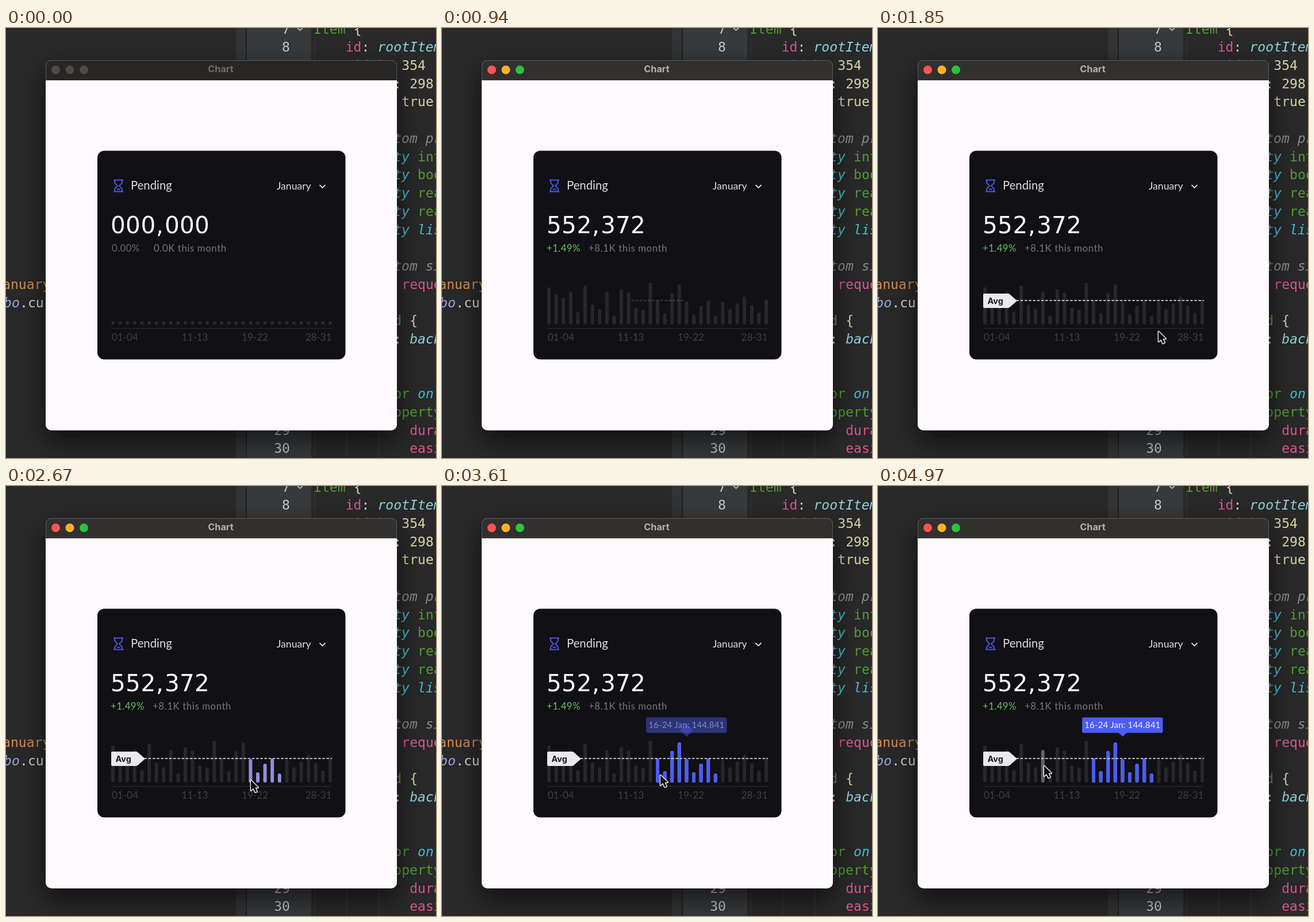
Animation, 748 px wide and 748 px high, one loop 5 s. Source, as an HTML page with a canvas:

```html
<!DOCTYPE html>
<html lang="en">
<head>
<meta charset="utf-8">
<title>Chart</title>
<style>
html, body { margin: 0; width: 100%; height: 100%; overflow: hidden; background: #28292a; }
canvas { display: block; }
</style>
</head>
<body>
<canvas id="stage" width="748" height="748"></canvas>
<script>
const ctx = document.getElementById('stage').getContext('2d');
const LOOP = 5000, CARD = '#111014', BLUE = '#4c5cf5';
const MONO = '"DejaVu Sans Mono", monospace', LATO = 'Lato, sans-serif', INTER = 'Inter, sans-serif';
const GREEN = '#4f9d31', PINK = '#e2528e', CYAN = '#45bccf', PALE = '#8fd2df',
      SAND = '#dad7a4', GREY = '#87888a', PLAIN = '#d4d4d1';

// [line, column, text, colour, italic]
const CODE = [
  [7, 0, 'Item', GREEN], [7, 5, '{', SAND],
  [8, 4, 'id', PINK], [8, 6, ':', PLAIN], [8, 8, 'rootItem', PALE, 1],
  [9, 4, 'width', PINK], [9, 11, '354', SAND],
  [10, 10, ':', PLAIN], [10, 12, '298', SAND],
  [11, 11, 'true', SAND],
  [13, 4, '// Custom properties', GREY, 1],
  ...['int', 'bool', 'real', 'real'].flatMap((type, i) =>
    [[14 + i, 4, 'property', CYAN, 1], [14 + i, 13, type, GREEN]]),
  [18, 4, 'property', CYAN, 1], [18, 13, 'list', CYAN, 1],
  [20, 4, '// Custom signals', GREY, 1],
  [21, 11, 'request', PINK],
  [23, 10, 'd', GREEN], [23, 12, '{', SAND],
  [24, 10, ':', PLAIN], [24, 12, 'back', PALE, 1],
  [27, 4, 'Behavior', GREEN], [27, 13, 'on', CYAN, 1],
  [28, 8, 'PropertyAnimation', GREEN],
  [29, 12, 'duration', PINK], [30, 12, 'easing', PINK]
];

const HEIGHTS = [65, 53, 47, 57, 22, 68, 35, 27, 57, 16, 62, 56, 30, 26, 73, 42,
                 20, 55, 70, 41, 18, 33, 42, 16, 40, 27, 37, 49, 34, 21, 44];
// [digit, centre x, acceleration]
const REELS = [[5, 195, 1.36], [5, 221, 1.36], [2, 247.5, 1.44],
               [3, 289, 1.42], [7, 315, 1.32], [2, 341, 1.44]];
// [time, x, y]
const POINTER = [[1380, 575, 765], [1850, 487, 527], [2180, 476, 517], [2670, 425, 511],
                 [3250, 379, 502], [3900, 379, 502], [4500, 318, 491], [4970, 288, 486]];
const PRESS = 2180, RELEASE = 3480;

const ramp = (t, from, to) => Math.min(1, Math.max(0, (t - from) / (to - from)));
const smooth = x => x * x * (3 - 2 * x);
const barX = i => 186 + i * 12.6;

function rect(x, y, w, h, color, r = 0) {
  ctx.fillStyle = color;
  ctx.beginPath();
  ctx.roundRect(x, y, w, h, r);
  ctx.fill();
}

function text(str, x, y, font, color, align = 'left', spacing = 0) {
  ctx.font = font;
  ctx.fillStyle = color;
  ctx.textAlign = align;
  ctx.letterSpacing = spacing + 'px';
  ctx.fillText(str, x, y);
}

function stroke(path, color, width, dash = []) {
  ctx.strokeStyle = color;
  ctx.lineWidth = width;
  ctx.setLineDash(dash);
  ctx.stroke(new Path2D(path));
}

function fill(path, color) {
  ctx.fillStyle = color;
  ctx.fill(new Path2D(path));
}

function faded(alpha, draw) {
  if (alpha <= 0) return;
  ctx.save();
  ctx.globalAlpha = alpha;
  draw();
  ctx.restore();
}

function editor() {
  const lineY = n => 41.3 + 31.73 * (n - 8);
  const mono = italic => (italic ? 'italic ' : '') + '23.1px ' + MONO;
  rect(0, 0, 748, 748, '#29292a');
  rect(400, 0, 18, 748, '#323334');
  rect(417, 0, 2, 748, '#202122');
  rect(419, 0, 112, 748, '#37393b');
  stroke('M537 16V748M592.5 690V748M648.5 690V748', '#3b3c3d', 1);
  for (const n of [7, 8, 9, 29, 30]) text(n, 494, lineY(n), mono(), '#c5c6c6', 'right');
  stroke('M507 0L511.5 4L516 0', '#b5b6b7', 1.8);
  for (const [n, col, str, color, italic] of CODE)
    text(str, 535 + col * 13.93, lineY(n), mono(italic), color);
  text('anuary', -6, lineY(21), mono(), '#d58b49');
  text('bo', -4, lineY(22), mono(1), '#98a5dc');
  text('.cur', 24, lineY(22), mono(), PLAIN);
}

function appWindow(active) {
  ctx.save();
  ctx.shadowColor = 'rgba(0,0,0,.6)';
  ctx.shadowBlur = 46;
  ctx.shadowOffsetY = 18;
  rect(69, 56, 611, 644, '#fdf9fc', 10);
  ctx.restore();
  rect(69, 56, 611, 35, active ? '#31302f' : '#272625', [10, 10, 0, 0]);
  stroke('M69.5 91V66Q69.5 56.5 79 56.5H670Q679.5 56.5 679.5 66V91', '#5a5958', 1);
  const lights = active ? ['#ff5450', '#fdb12b', '#2bc23e'] : Array(3).fill('#4c4b4a');
  lights.forEach((c, i) => rect(79 + i * 24.5, 65.2, 15, 15, c, 7.5));
  text('Chart', 373.5, 76.5, 'bold 16.3px ' + INTER, active ? '#b3b2b1' : '#6d6c6b', 'center');
  rect(159, 213.5, 431.5, 363, CARD, 12);
}

function header() {
  stroke('M187 264.5H204M187 284.5H204M189 265V268.5Q189 270 190.5 271L194 274.5L190.5 278' +
    'Q189 279 189 280.5V284M202 265V268.5Q202 270 200.5 271L197 274.5L200.5 278' +
    'Q202 279 202 280.5V284M192.5 280.5H198.5', '#4b57dc', 2);
  text('Pending', 217, 281, '20.3px ' + LATO, '#dededf');
  text('January', 471, 280.5, '17.6px ' + LATO, '#dededf');
  stroke('M545.5 273L550.5 278L555.5 273', '#dededf', 1.8);
}

function counter(p) {
  ctx.save();
  ctx.beginPath();
  ctx.rect(180, 319, 180, 46);
  ctx.clip();
  const font = '40.5px "DejaVu Sans", sans-serif';
  for (const [digit, x, power] of REELS) {
    const pos = (10 + digit) * p ** power;
    for (let n = Math.floor(pos); n <= Math.ceil(pos); n++)
      text(n % 10, x, 356.5 + (n - pos) * 44, font, '#fff', 'center');
  }
  text(',', 267.5, 356.5, font, '#fff', 'center');
  if (p > 0 && p < 1) {
    for (const [edge, inner] of [[319, 333], [365, 351]]) {
      const g = ctx.createLinearGradient(0, edge, 0, inner);
      g.addColorStop(0, CARD);
      g.addColorStop(1, 'rgba(17,16,20,0)');
      rect(180, Math.min(edge, inner), 180, 14, g);
    }
  }
  ctx.restore();

  const sign = p > 0 ? '+' : '', shift = p > 0 ? 2 : 0, small = '16.8px ' + LATO;
  text(sign + (1.49 * p).toFixed(2) + '%', 184 - shift, 388.5, small, p > 0 ? '#61c662' : '#69686c', 'left', 0.4);
  text(sign + (8.1 * p).toFixed(1) + 'K this month', 257 - shift, 388.5, small, '#77767a', 'left', 0.6);
}

function pointerAt(t) {
  if (t < POINTER[0][0]) return null;
  const k = POINTER.findIndex(key => key[0] > t);
  if (k < 0) return POINTER.at(-1).slice(1);
  const a = POINTER[k - 1], b = POINTER[k], f = smooth(ramp(t, a[0], b[0]));
  return [a[1] + (b[1] - a[1]) * f, a[2] + (b[2] - a[2]) * f];
}

function bars(t, p, pointer) {
  const over = pointer && pointer[1] < 519 ? Math.round((pointer[0] - 186) / 12.6) : -1;
  const first = t < PRESS ? 99 : t < RELEASE ? over : 15;
  HEIGHTS.forEach((full, i) => {
    const h = 6 + (full - 6) * p;
    const bar = color => rect(barX(i) - 3, 516 - h, 6, h, color, 3);
    const selected = i >= first && i <= 23;
    bar(selected ? '#8f8fdc' : i === over ? '#625f6b' : '#28272d');
    if (selected) faded(ramp(t, RELEASE, RELEASE + 110), () => bar(BLUE));
  });
  rect(183, 522, 384, 1, '#2b2a2f');
  [['01-04', 184, 'left'], ['11-13', 328.5, 'center'], ['19-22', 433, 'center'], ['28-31', 566.5, 'right']]
    .forEach(([label, x, align]) => text(label, x, 543.5, '17px ' + LATO, '#403f44', align));
}

function average(t) {
  const grow = ramp(t, 820, 1330), half = 192 * grow;
  faded(grow, () => stroke(`M${375 - half} 474H${375 + half}`, '#f0f0f2', 1.6, [4.6, 2.6]));
  faded(ramp(t, 1300, 1550), () => {
    fill('M185 462H226Q228 462 229.5 463.4L242 474.5L229.5 485.6Q228 487 226 487H185Q183 487 183 485V464Q183 462 185 462Z', '#e9e9ee');
    text('Avg', 190.5, 479.5, 'bold 14.4px ' + INTER, '#1b1a1f');
  });
}

function tooltip(t) {
  faded(ramp(t, 3500, 3745), () => {
    rect(355, 402.5, 140.5, 27, BLUE, 3);
    fill('M425.5 414L437 425L425.5 436L414 425Z', BLUE);
    text('16-24 Jan: 144.841', 425.3, 420.5, '15px ' + LATO, '#f4f4ff', 'center', 0.15);
  });
}

function cursor([x, y]) {
  ctx.save();
  ctx.translate(x, y);
  ctx.lineJoin = 'round';
  const arrow = 'M1 1V18.6L5.2 14.8L8.6 21.8L11.6 20.4L8.4 13.6H13.6Z';
  stroke(arrow, '#f2f2f4', 2.8);
  fill(arrow, '#0b0b0d');
  ctx.restore();
}

function draw(now) {
  const t = now % LOOP, p = ramp(t, 30, 784), pointer = pointerAt(t);
  editor();
  appWindow(t >= 30);
  header();
  counter(p);
  bars(t, p, pointer);
  average(t);
  tooltip(t);
  if (pointer) cursor(pointer);
}

const start = performance.now();
function tick() {
  draw(performance.now() - start);
  requestAnimationFrame(tick);
}
tick();
</script>
</body>
</html>
```
